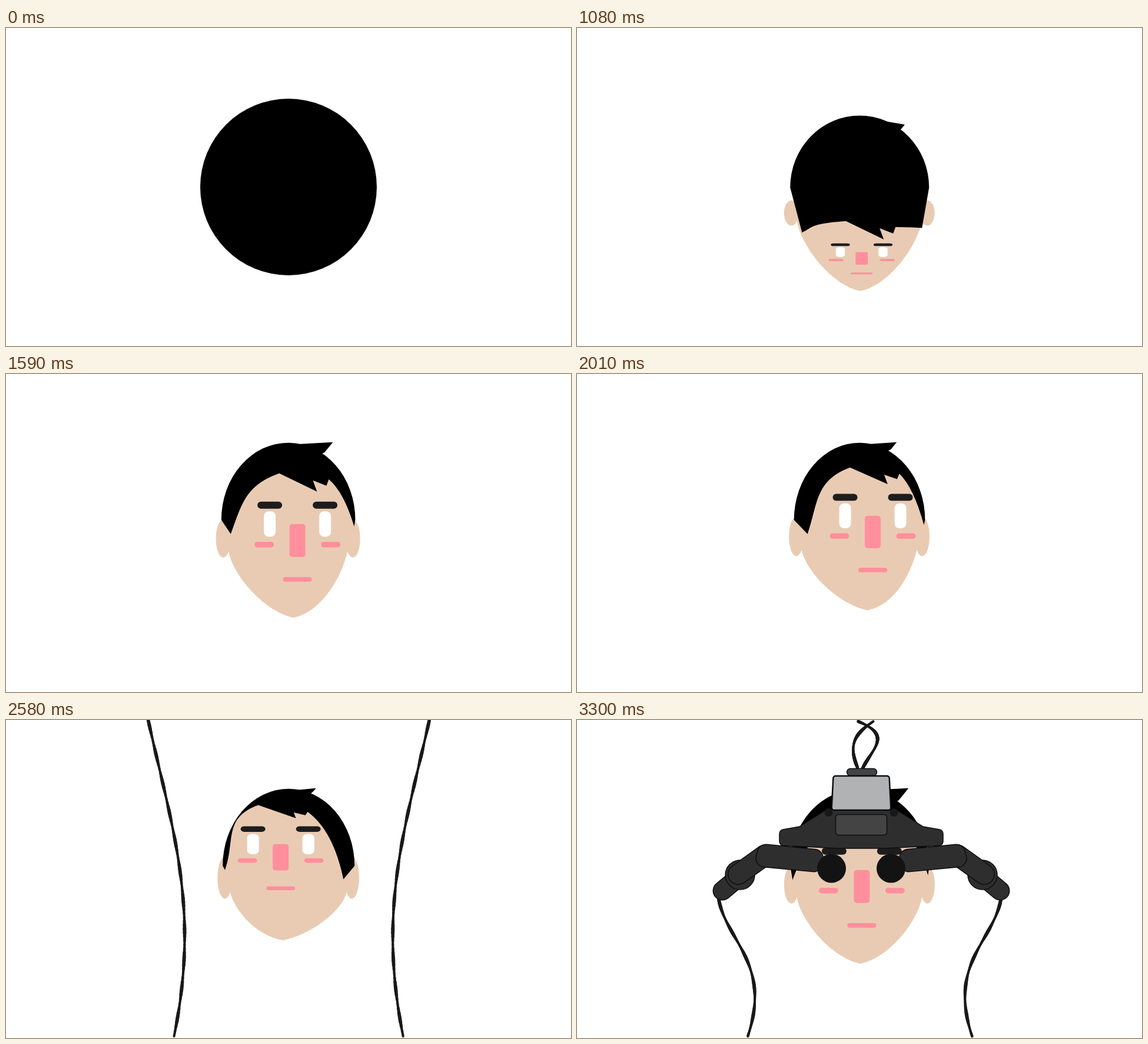
Recreate the animation shown at these times as an HTML page with a canvas. Size 960 px wide and 540 px high, loop 3330 ms.

```html
<!DOCTYPE html>
<html lang="en">
<head>
<meta charset="utf-8">
<title>Headset</title>
<style>
  html, body { margin: 0; width: 100%; height: 100%; overflow: hidden; background: #fff; }
  canvas { display: block; width: 960px; height: 540px; }
</style>
</head>
<body>
<canvas id="stage" width="960" height="540"></canvas>
<script>
const ctx = document.getElementById('stage').getContext('2d');
const LOOP = 3330, STEP = 30;
const SKIN = '#e9cbb3', PINK = '#ff8f9c', DARK = '#2e2e2e', PANEL = '#444', LINE = '#0e0e0e', BROW = '#1d1d1d';
const LEVEL = 255, AXIS = 483;

// Head turn: time, [sideways shift, eye height]. Everything else follows from these two.
const turns = [
  [540, [0, 380]], [1080, [0, 380]], [1400, [0, LEVEL]], [1590, [12, LEVEL]],
  [1980, [19, 241]], [2070, [19, 241]], [2440, [-17, 211]], [2600, [-17, 211]], [2775, [0, LEVEL]]
];

// Left hanging cord as a Bézier curve; the right one is its mirror image.
const hung = [242,2, 284,190, 330,320, 286,537];
const cordKeys = [
  [2080, [322,-40, 324,-30, 326,-20, 328,-10]], [2400, hung], [2580, hung],
  [2760, [240,303, 252,375, 332,412, 290,537]]
];

const smooth = (t, from, to) => {
  const x = Math.min(1, Math.max(0, (t - from) / (to - from)));
  return x * x * (3 - 2 * x);
};
const mix = (a, b, k) => a + (b - a) * k;
const noise = n => { const s = Math.sin(n * 127.1) * 43758.5453; return s - Math.floor(s) - 0.5; };

function between(keys, t) {
  let i = 0;
  while (i < keys.length - 2 && t >= keys[i + 1][0]) i++;
  const [t0, a] = keys[i], [t1, b] = keys[i + 1], k = smooth(t, t0, t1);
  return a.map((v, j) => mix(v, b[j], k));
}

function paint(fill, stroke) {
  ctx.fillStyle = fill;
  ctx.fill();
  if (!stroke) return;
  ctx.strokeStyle = LINE;
  ctx.lineWidth = stroke;
  ctx.stroke();
}

function pill(x, y, w, h, r, fill, stroke) {
  ctx.beginPath();
  ctx.roundRect(x - w / 2, y - h / 2, w, h, Math.min(r, w / 2, h / 2));
  paint(fill, stroke);
}

function oval(x, y, rx, ry, fill, stroke) {
  ctx.beginPath();
  ctx.ellipse(x, y, rx, ry, 0, 0, 7);
  paint(fill, stroke);
}

function polygon(pts, r, fill, stroke) {
  const last = pts[pts.length - 1];
  ctx.beginPath();
  ctx.moveTo((last[0] + pts[0][0]) / 2, (last[1] + pts[0][1]) / 2);
  pts.forEach((p, i) => ctx.arcTo(...p, ...pts[(i + 1) % pts.length], r));
  ctx.closePath();
  paint(fill, stroke);
}

const mirrored = half => [...half, ...half.map(([x, y]) => [-x, y]).reverse()];

function bothSides(part) {
  for (const side of [1, -1]) {
    ctx.save();
    ctx.scale(side, 1);
    part();
    ctx.restore();
  }
}

function rod(x0, y0, x1, y1, w) {
  for (const [width, color] of [[w, LINE], [w - 3, DARK]]) {
    ctx.beginPath();
    ctx.moveTo(x0, y0);
    ctx.lineTo(x1, y1);
    ctx.lineWidth = width;
    ctx.strokeStyle = color;
    ctx.stroke();
  }
}

// A twisted cord: a Bézier curve whose thickness swells and thins.
function cord(curve, seed) {
  const c = curve.map((v, i) => v + 1.2 * noise(seed + i));
  const at = (u, i) => {
    const v = 1 - u;
    return v * v * v * c[i] + 3 * v * v * u * c[i + 2] + 3 * v * u * u * c[i + 4] + u * u * u * c[i + 6];
  };
  ctx.strokeStyle = '#191919';
  let x = c[0], y = c[1], run = 0;
  for (let u = 0.0125; u < 1.01; u += 0.0125) {
    const nx = at(u, 0), ny = at(u, 1);
    run += Math.hypot(nx - x, ny - y);
    ctx.lineWidth = 5 + Math.sin(run / 8);
    ctx.beginPath();
    ctx.moveTo(x, y);
    ctx.lineTo(nx, ny);
    ctx.stroke();
    [x, y] = [nx, ny];
  }
}

function features(x, y, squash) {
  ctx.save();
  ctx.translate(x, y);
  ctx.scale(Math.min(1, 0.5 + 0.7 * squash), squash);
  bothSides(() => {
    pill(47, -32, 42, 12, 6, BROW);
    pill(47, 0, 20, 43, 8, '#fff');
    pill(56.5, 35, 33, 9.5, 5, PINK);
  });
  pill(0, 28, 27, 56, 5, PINK);
  pill(0, 94, 49, 8, 4, PINK);
  ctx.restore();
}

function head(yaw, eyeY) {
  const up = Math.max(0, LEVEL - eyeY), down = Math.max(0, eyeY - LEVEL), turn = Math.abs(yaw);
  const squash = 1 - (up / 98) ** 2 - 0.0049 * down;
  const cx = 480, cy = 248 + 0.18 * down, top = 117 + 0.25 * down;
  const rx = 118 - 0.35 * turn, ry = cy - top;

  // Ears and jaw
  const earL = 364 + 0.45 * turn, earR = 595 - 0.45 * turn;
  const earY = 280 + 0.27 * (eyeY - LEVEL), earH = 64 - 0.17 * (eyeY - LEVEL);
  oval(earL, earY, 12.5, earH / 2, SKIN);
  oval(earR, earY, 12.5, earH / 2, SKIN);

  const chinX = 481 + 0.65 * yaw, chinY = 414 - 0.9 * up + 0.257 * down;
  const jawY = earY + 0.4 * earH, bendY = mix(jawY, chinY, 0.4);
  ctx.beginPath();
  ctx.ellipse(cx, cy, rx - 2, ry - 2, 0, Math.PI, 2 * Math.PI);
  ctx.lineTo(earR - 10, jawY);
  ctx.bezierCurveTo(earR - 21, bendY, chinX + 46, chinY - 9, chinX, chinY);
  ctx.bezierCurveTo(chinX - 46, chinY - 9, earL + 21, bendY, earL + 10, jawY);
  paint(SKIN);

  features(AXIS + 0.5 + yaw, eyeY, squash);

  // Hair: cap, right sideburn, two fringe spikes, parting, left sideburn
  const leftX = cx - rx + 4 + Math.max(0, yaw) + 0.13 * down, leftY = 272 + 0.6 * down + Math.min(0, yaw);
  const rightX = cx + rx - 2 + Math.min(0, yaw) - 0.08 * down, rightY = 264 + 0.6 * down - 0.4 * yaw;
  const tipX = 521 + 0.65 * yaw - 0.4 * up, tipY = eyeY - 55 * squash, cut = 1 - 0.011 * up;
  const startY = tipY - 21 * cut, partX = tipX - 64, partY = tipY - 31 + 0.2 * up;
  ctx.beginPath();
  ctx.ellipse(cx, cy, rx, ry, 0, Math.PI, 2 * Math.PI);
  ctx.lineTo(rightX, rightY);
  ctx.quadraticCurveTo(rightX - 17, mix(startY, rightY, 0.28), tipX + 20, startY);
  ctx.lineTo(tipX + 16, tipY - 10 * cut);
  ctx.lineTo(tipX - 7 * cut, tipY - 19 * cut);
  ctx.lineTo(tipX, tipY);
  ctx.lineTo(partX, partY);
  ctx.bezierCurveTo(partX - 60, mix(partY, leftY, 0.2), leftX + 18, mix(partY, leftY, 0.55), leftX, leftY);
  paint('#000');

  const tuftX = 563 - 0.6 * (up + turn) - 0.05 * down, tuftY = top - 1 + 0.13 * down;
  const tuft = (tuftX - 518) / 45;
  ctx.beginPath();
  ctx.moveTo(cx + 5, top + 3);
  ctx.lineTo(tuftX, tuftY);
  ctx.lineTo(tuftX - 17 * tuft, tuftY + 21 * tuft);
  ctx.lineTo(cx + 5, top + 40);
  paint('#000');
}

function arm() {
  rod(-206, 265, -236, 290, 33);
  oval(-206, 263, 25, 25, DARK, 1.5);
  rod(-163, 229, -209, 262, 36);
  polygon([[-173, 210], [-63, 221], [-68, 259], [-183, 248]], 15, DARK, 1.5);
  oval(-50.5, 252, 24.5, 24.5, '#131313');
}

function headset(t, seed) {
  ctx.save();
  ctx.translate(AXIS, 301 * (smooth(t, 2580, 2760) - 1));
  cord([-7,81, -21,44, -13,24, 20,3], seed);
  cord([2,82, 19,48, 54,26, -5,2], seed + 9);
  pill(1, 88.5, 51, 12, 6, PANEL, 1.5);
  bothSides(arm);
  polygon(mirrored([[-59, 152], [-105, 181], [-139, 187], [-139, 213], [-40, 218]]), 7, DARK, 1.5);
  bothSides(() => oval(55.5, 157, 7, 7, '#181818'));
  polygon(mirrored([[-47.5, 95], [-50.5, 153]]), 4, '#b1b2b4', 2.5);
  pill(0, 178, 87, 35, 5, PANEL, 1.5);
  ctx.restore();
}

function draw(t) {
  const seed = Math.floor(t / 60) * 211 % 997;
  ctx.fillStyle = '#fff';
  ctx.fillRect(0, 0, 960, 540);
  ctx.lineCap = ctx.lineJoin = 'round';

  // The disc shrinks while the head grows out from behind it.
  const grow = smooth(t, 540, 1080);
  if (t >= 540) {
    ctx.save();
    ctx.translate(480 + 0.8 * noise(seed), 270 + 0.8 * noise(seed + 1));
    ctx.scale(mix(0.8, 1, grow), mix(0.8, 1, grow));
    ctx.translate(-480, -270);
    head(...between(turns, t));
    ctx.restore();
  }
  if (grow < 1) oval(480, 270, mix(150, 60, grow), mix(150, 60, grow), '#000');

  if (t > 2080) {
    const left = between(cordKeys, t);
    cord(left, seed + 20);
    cord(left.map((v, i) => i % 2 ? v : 961 - v), seed + 40);
  }
  if (t > 2580) headset(t, seed);
}

const start = performance.now();
function tick() {
  const t = (performance.now() - start) % LOOP;
  draw(Math.floor(t / STEP) * STEP);
  requestAnimationFrame(tick);
}
tick();
</script>
</body>
</html>
```
